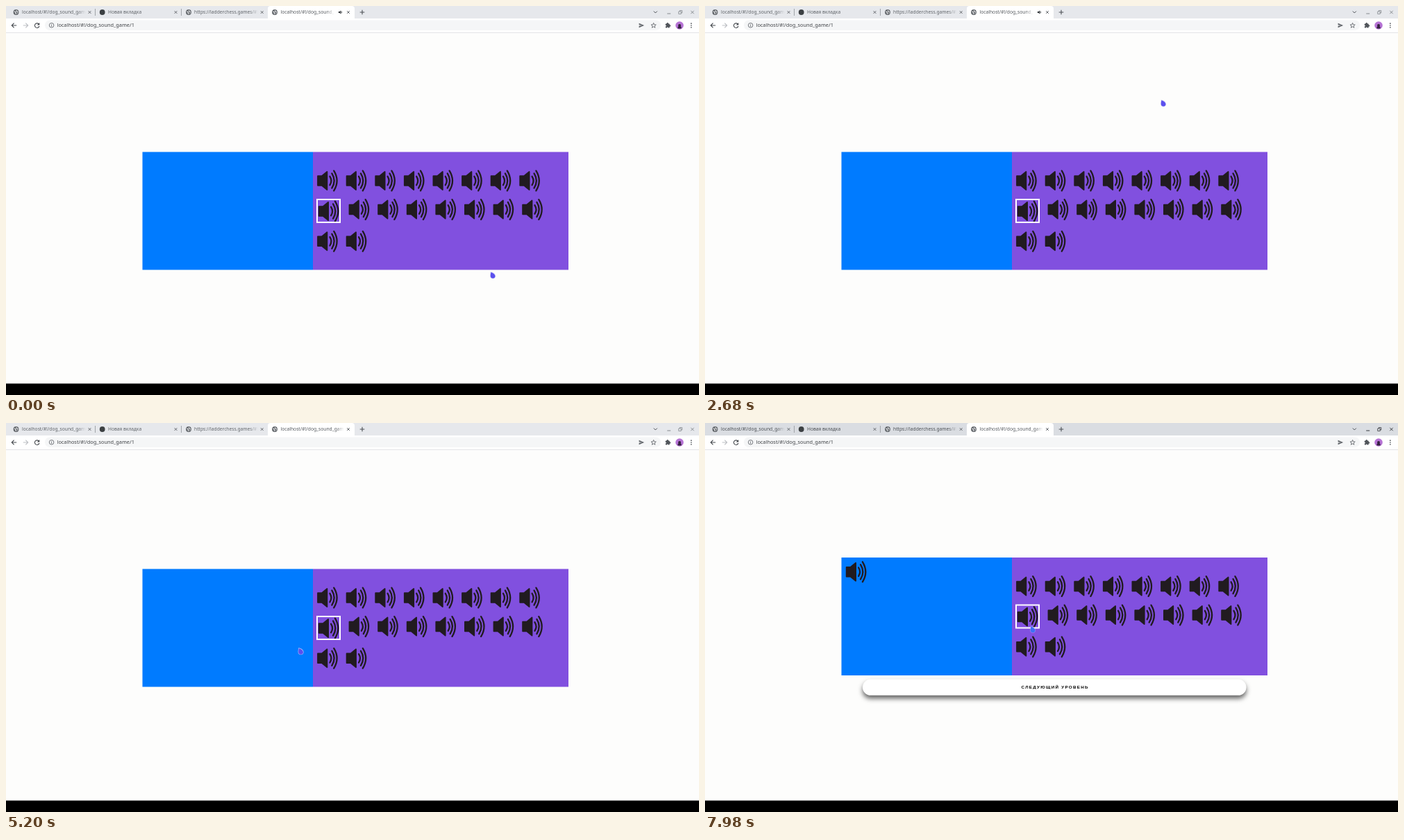
Write an HTML page with a canvas that moves like this. It is 998 px wide and 561 px high and loops after 8 s.

```html
<!DOCTYPE html>
<html lang="ru">
<head>
<meta charset="utf-8">
<title>Dog sound game</title>
<style>
html, body { margin: 0; width: 100%; height: 100%; overflow: hidden; background: #fdfdfc; }
canvas { display: block; }
</style>
</head>
<body>
<canvas id="stage" width="998" height="561"></canvas>
<script>
const ctx = document.getElementById('stage').getContext('2d');
const LOOP = 8000, FOCUS_AT = 7420, SOLVED_AT = 7640;
const INK = '#211b20', GREY = '#5f6368';
const UI = '"Noto Sans", sans-serif';

// Pointer stops: time, x, y
const STOPS = [
  [0, 701, 388.5], [1100, 296, 130.5], [1130, 296, 130.5],
  [2680, 660, 140.5], [2800, 660, 140.5],
  [4320, 704.5, 264.5], [4950, 560, 401],
  [5200, 424.5, 329.5], [5300, 424.5, 329.5],
  [7260, 478.5, 296], [7400, 478, 296], [7980, 472, 298], [8000, 472, 298]
];

function pointerAt(t) {
  const i = Math.max(1, STOPS.findIndex(s => s[0] >= t));
  const [t0, x0, y0] = STOPS[i - 1], [t1, x1, y1] = STOPS[i];
  const u = (t - t0) / (t1 - t0), e = u * u * (3 - 2 * u);
  return [x0 + (x1 - x0) * e, y0 + (y1 - y0) * e];
}

function rect(x, y, w, h, color) {
  ctx.fillStyle = color;
  ctx.fillRect(x, y, w, h);
}

function pill(x, y, w, h, r, color) {
  ctx.fillStyle = color;
  ctx.beginPath();
  ctx.roundRect(x, y, w, h, r);
  ctx.fill();
}

function disc(x, y, r, color) {
  ctx.fillStyle = color;
  ctx.beginPath();
  ctx.arc(x, y, r, 0, Math.PI * 2);
  ctx.fill();
}

function stroke(path, x, y, color, width = 1) {
  ctx.save();
  ctx.translate(x, y);
  ctx.strokeStyle = color;
  ctx.lineWidth = width;
  ctx.stroke(new Path2D(path));
  ctx.restore();
}

function fill(path, x, y, color) {
  ctx.save();
  ctx.translate(x, y);
  ctx.fillStyle = color;
  ctx.fill(new Path2D(path));
  ctx.restore();
}

function text(str, x, y, size, color) {
  ctx.font = `${size}px ${UI}`;
  ctx.fillStyle = color;
  ctx.fillText(str, x, y);
}

function fadedText(str, x, y, end, color) {
  const g = ctx.createLinearGradient(end - 12, 0, end, 0);
  g.addColorStop(0, color);
  g.addColorStop(1, color + '00');
  text(str, x, y, 6.7, g);
}

function globe(x, y) {
  disc(x, y, 3.9, GREY);
  stroke('M-2.6 -1.2 L-.6 -.2 L-.8 1.4 L.2 2.8 M.2 -2.8 L1 -1.2 L2.8 -.6 M1.2 1.2 L2.6 1', x, y, '#f4f5f6', 1.1);
}

function cross(x, y, r, color) {
  stroke(`M${-r} ${-r}L${r} ${r}M${r} ${-r}L${-r} ${r}`, x, y, color, .95);
}

function drawTabs(focused, audio) {
  const label = focused ? '#4a4e53' : '#606469';
  const button = focused ? '#35383c' : '#85898e';
  rect(0, 0, 998, 19, focused ? '#dadde2' : '#e6e8ec');
  pill(377, 0, 125, 20, [4, 4, 0, 0], '#ffffff');
  rect(128, 4, 1, 10, '#a0a4a9');
  rect(252, 4, 1, 10, '#a0a4a9');

  globe(14.5, 9);
  globe(263, 9);
  globe(387, 9);
  disc(138.7, 9, 3.9, '#3c4043');

  const title = 'localhost/#!/dog_sound_game/1';
  const clip = (str, x, end, color) => {
    ctx.save();
    ctx.beginPath();
    ctx.rect(x, 0, end - x, 18);
    ctx.clip();
    fadedText(str, x, 11.3, end, color);
    ctx.restore();
  };
  clip(title, 23, 115, label);
  clip('Новая вкладка', 147, 239, label);
  clip('https://ladderchess.games/#!/', 271, 363, label);
  clip(title, 395.5, audio > 0 ? 473 : 487, '#55595e');

  if (audio > 0) {
    ctx.globalAlpha = audio;
    fill('M-2.5 -1H-1L1 -2.6V2.6L-1 1H-2.5Z', 481.3, 9, '#3c4043');
    stroke('M1.7 -1.5Q3.2 0 1.7 1.5', 481.3, 9, '#3c4043', .8);
    ctx.globalAlpha = 1;
  }
  for (const x of [120.5, 244.5, 368.7, 493]) cross(x, 9, 1.9, GREY);
  stroke('M-3.3 0H3.3M0 -3.3V3.3', 513, 9, '#4b4f54', 1.1);

  stroke('M-2.5 -1L0 1.5L2.5 -1', 935.3, 8.5, '#4b4f54', 1);
  stroke('M-2.5 2H2.5', 954.7, 9, button, 1);
  stroke('M-2.5 -1H1V2.5H-2.5ZM-1 -1V-2.5H2.5V1H1', 971.2, 9, button, .8);
  cross(988.5, 9, 2.2, button);
}

function drawToolbar() {
  rect(0, 18, 998, 20, '#ffffff');
  pill(56, 20.5, 887, 14.5, 7.2, '#f5f6f7');
  rect(0, 38, 998, 1, '#e3e4e6');

  const arrow = 'M3.6 0H-3.4M0 -3.4L-3.4 0L0 3.4';
  stroke(arrow, 11.6, 28, '#45494e', 1.1);
  ctx.save();
  ctx.translate(28.3, 28);
  ctx.scale(-1, 1);
  stroke(arrow, 0, 0, '#bcbfc3', 1.1);
  ctx.restore();
  stroke('M2.5 -2A3.3 3.3 0 1 0 3.2 1', 44.7, 28, '#45494e', 1.1);
  fill('M3.6 -4V-.5H.1Z', 44.7, 28, '#45494e');

  stroke('M3.3 0A3.3 3.3 0 1 1 -3.3 0A3.3 3.3 0 1 1 3.3 0M0 -.5V2M0 -2V-1.1', 65.6, 27.8, GREY, .85);
  text('localhost/#!/dog_sound_game/1', 73.5, 30.3, 7.35, '#3f4246');

  fill('M-3.7 -3.2L3.8 0L-3.7 3.2V.7L1 0L-3.7 -.7Z', 915.3, 28, GREY);
  let star = '';
  for (let i = 0; i < 10; i++) {
    const r = i % 2 ? 1.6 : 3.8, a = i * Math.PI / 5 - Math.PI / 2;
    star += `${i ? 'L' : 'M'}${r * Math.cos(a)} ${r * Math.sin(a)}`;
  }
  stroke(star + 'Z', 932.6, 28.2, GREY, .85);
  pill(949.8, 25.5, 5.9, 6, .8, '#50545a');
  disc(952.7, 25.3, 1.2, '#50545a');
  disc(956, 28.4, 1.2, '#50545a');
  disc(950, 28.6, .9, '#ffffff');
  disc(952.7, 31.4, .9, '#ffffff');

  disc(970, 28, 5.8, '#b673d5');
  disc(970, 28, 2, '#33213e');
  pill(967.3, 29, 5.4, 3.6, [2.4, 2.4, 1, 1], '#33213e');
  for (const y of [25.2, 28, 30.8]) disc(986.8, y, .85, '#4b4f54');
}

function speaker(x, y) {
  ctx.lineCap = 'round';
  ctx.lineJoin = 'round';
  const body = 'M-14 -6.8H-8.2L-.6 -13V13L-8.2 6.8H-14Z';
  fill(body, x, y, INK);
  stroke(body, x, y, INK, 1.8);
  stroke('M3.4 -6.2Q7.4 0 3.4 6.2M6.3 -10.6Q13 0 6.3 10.6M9.2 -14.4Q18 0 9.2 14.4', x, y, INK, 2.3);
  ctx.lineCap = 'butt';
  ctx.lineJoin = 'miter';
}

function drawGame(solved) {
  ctx.save();
  if (solved) ctx.translate(0, -16.5);
  rect(196.5, 210.5, 245.5, 170, '#007bff');
  rect(442, 210.5, 368, 170, '#8150df');

  const gap = 41.6;
  for (let i = 0; i < 8; i++) speaker(463 + i * gap, 252);
  speaker(464.7, 296);
  ctx.strokeStyle = '#ffffff';
  ctx.lineWidth = 2;
  ctx.strokeRect(448, 279, 33, 33);
  for (let i = 0; i < 7; i++) speaker(508.5 + i * gap, 293.5);
  for (let i = 0; i < 2; i++) speaker(463 + i * gap, 339.3);
  if (solved) speaker(217.7, 231.2);
  ctx.restore();
}

function drawButton() {
  ctx.save();
  ctx.shadowColor = 'rgba(0,0,0,.62)';
  ctx.shadowBlur = 7.5;
  ctx.shadowOffsetY = 4.5;
  pill(227, 369.5, 552.5, 23.3, 11.65, '#ffffff');
  ctx.restore();
  ctx.save();
  ctx.font = 'bold 6.24px "Liberation Sans", sans-serif';
  ctx.letterSpacing = '1.3px';
  ctx.fillStyle = '#000000';
  ctx.fillText('СЛЕДУЮЩИЙ УРОВЕНЬ', 455.5, 383);
  ctx.restore();
}

function drawPointer(t) {
  const [x, y] = pointerAt(t);
  if (t > 4240 && t < 4420) {
    for (let i = 0; i < 4; i++) {
      ctx.save();
      ctx.translate(x, y);
      ctx.rotate(i * Math.PI / 2);
      const petal = 'M0 -1Q-3 -4.5 0 -7.2Q3 -4.5 0 -1Z';
      fill(petal, 0, 0, '#6057dc');
      stroke(petal, 0, 0, '#a9e3ff', .9);
      ctx.restore();
    }
    disc(x, y, 1, '#65e4ff');
    return;
  }
  const drop = 'M-2.6 -4.6C1 -3.6 3.5 -1.2 3.5 1.2A3.4 3.4 0 0 1 -3.2 1.4C-3.4 -.6 -3 -2.4 -2.6 -4.6Z';
  const late = t > 7000;
  stroke(drop, x, y, late ? 'rgba(200,205,255,.45)' : 'rgba(205,205,245,.8)', 1.4);
  fill(drop, x, y, late ? '#3f6ff5' : '#5b50ee');
}

function draw(t) {
  const solved = t >= SOLVED_AT;
  const audio = Math.min(1, Math.max(0, (4420 - t) / 200));
  rect(0, 0, 998, 561, '#fdfdfc');
  drawTabs(t >= FOCUS_AT, audio);
  drawToolbar();
  drawGame(solved);
  if (solved) drawButton();
  rect(0, 544.5, 998, 16.5, '#000000');
  drawPointer(t);
}

const start = performance.now();
function tick() {
  draw((performance.now() - start) % LOOP);
  requestAnimationFrame(tick);
}
tick();
</script>
</body>
</html>
```
